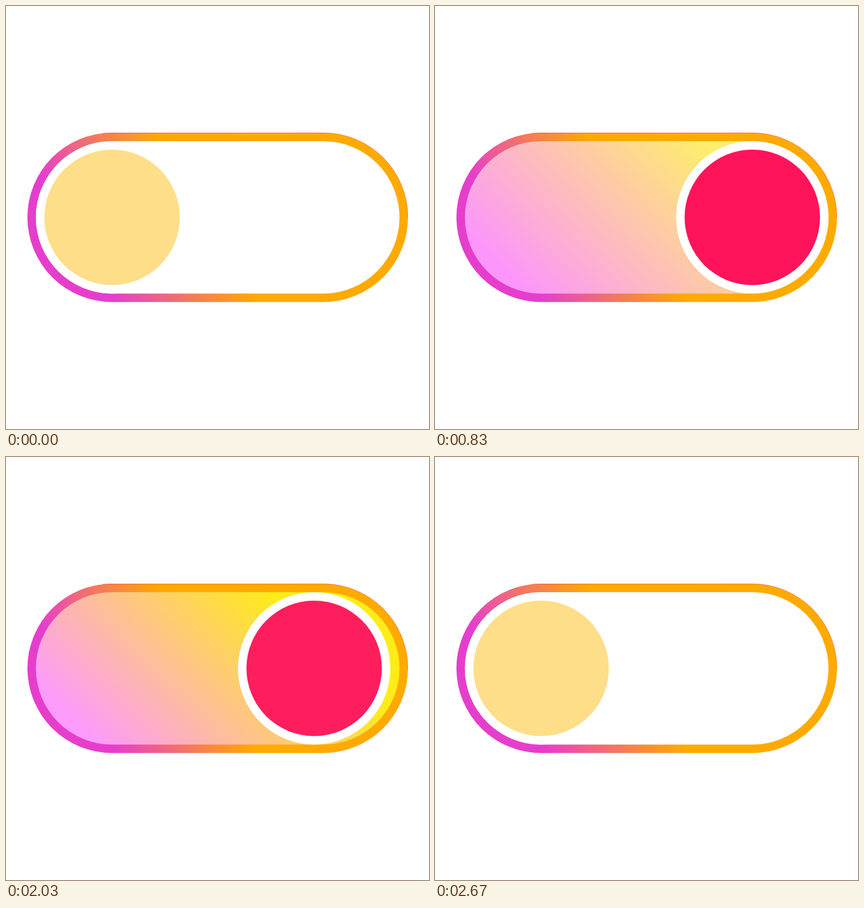
Write an HTML page with a canvas that moves like this. It is 748x748 px and loops after 3.03 s.

```html
<!DOCTYPE html>
<html lang="en">
<head>
<meta charset="utf-8">
<title>Toggle switch</title>
<style>
  html, body { margin: 0; width: 100%; height: 100%; overflow: hidden; background: #fff; }
  canvas { display: block; width: 748px; height: 748px; }
</style>
</head>
<body>
<canvas id="stage" width="748" height="748"></canvas>
<script>
const ctx = document.getElementById('stage').getContext('2d');

const LOOP = 3030;
const MOVE = 2 / 3;        // seconds for each slide
const BACK = 2;            // second at which the knob returns
const LEFT = 187.6, RIGHT = 561.1, MID = 373.75;
const OUTER = 149.75, INNER = 134.75, KNOB = 119.75;

const WHITE = [255, 255, 255];
const PINK = [252, 150, 251];
const PALE_YELLOW = [254, 238, 122];
const YELLOW = [255, 235, 11];
const KNOB_OFF = [255, 222, 137];
const KNOB_ON = [255, 20, 91];

const clamp = v => Math.min(1, Math.max(0, v));
const mix = (a, b, k) => a.map((v, i) => v + (b[i] - v) * k);
const rgb = c => `rgb(${c.map(Math.round)})`;

// Cubic Bezier easing with control points (x1, 0) and (0, 1).
function ease(x, x1) {
  let lo = 0, hi = 1;
  for (let i = 0; i < 30; i++) {
    const s = (lo + hi) / 2;
    if (3 * x1 * (1 - s) * (1 - s) * s + s * s * s < x) lo = s; else hi = s;
  }
  return lo * lo * (3 - 2 * lo);
}

function linear(x0, y0, x1, y1, from, to) {
  const g = ctx.createLinearGradient(x0, y0, x1, y1);
  g.addColorStop(0, from);
  g.addColorStop(1, to);
  return g;
}

// Diagonal gradient whose ends lie where x - y equals `from` and `to`.
const diagonal = (from, to, a, b) =>
  linear(MID + from / 2, MID - from / 2, MID + to / 2, MID - to / 2, a, b);

function pill(radius, fill) {
  ctx.beginPath();
  ctx.arc(LEFT, MID, radius, Math.PI / 2, Math.PI * 1.5);
  ctx.arc(RIGHT, MID, radius, -Math.PI / 2, Math.PI / 2);
  ctx.closePath();
  ctx.fillStyle = fill;
  ctx.fill();
}

function disc(x, radius, fill) {
  ctx.beginPath();
  ctx.arc(x, MID, radius, 0, Math.PI * 2);
  ctx.fillStyle = fill;
  ctx.fill();
}

// 30-degree gradient, measured along its normal.
const nx = 0.865, ny = -0.503;
const borderFill = linear(-95 * nx, -95 * ny, 121 * nx, 121 * ny,
  'rgb(230,62,204)', 'rgb(255,170,0)');

function drawBorder() {
  pill(OUTER, borderFill);
  ctx.beginPath();
  ctx.moveTo(LEFT - 15, MID - OUTER + 0.75);
  ctx.arc(RIGHT, MID, OUTER - 0.4, -Math.PI / 2, 0);
  ctx.setLineDash([1, 1]);
  ctx.lineWidth = 1;
  ctx.strokeStyle = 'rgba(250,30,110,0.85)';
  ctx.stroke();
  ctx.setLineDash([]);
}

function draw(sec) {
  const going = clamp(sec / MOVE);
  const deepening = clamp((sec - MOVE) / (BACK - MOVE));
  const returning = clamp((sec - BACK) / MOVE);
  const on = going - returning;
  const slide = ease(going, 1 / 3) - ease(returning, 1 / 6);
  const x = LEFT + (RIGHT - LEFT) * slide;
  const yellow = mix(PALE_YELLOW, YELLOW, deepening);

  ctx.fillStyle = '#fff';
  ctx.fillRect(0, 0, 748, 748);
  drawBorder();
  pill(INNER, diagonal(-345, 235, rgb(mix(WHITE, PINK, on)), rgb(mix(WHITE, yellow, on))));
  disc(x, INNER, '#fff');
  disc(x, KNOB, rgb(mix(KNOB_OFF, KNOB_ON, on)));
}

// Steps of 30 per second, aligned to 10 ms ticks.
function play() {
  const tick = Math.floor(((performance.now() % LOOP) + 0.01) / 10);
  draw(Math.floor((tick + 0.5) * 0.3) / 30);
  requestAnimationFrame(play);
}
play();
</script>
</body>
</html>
```
